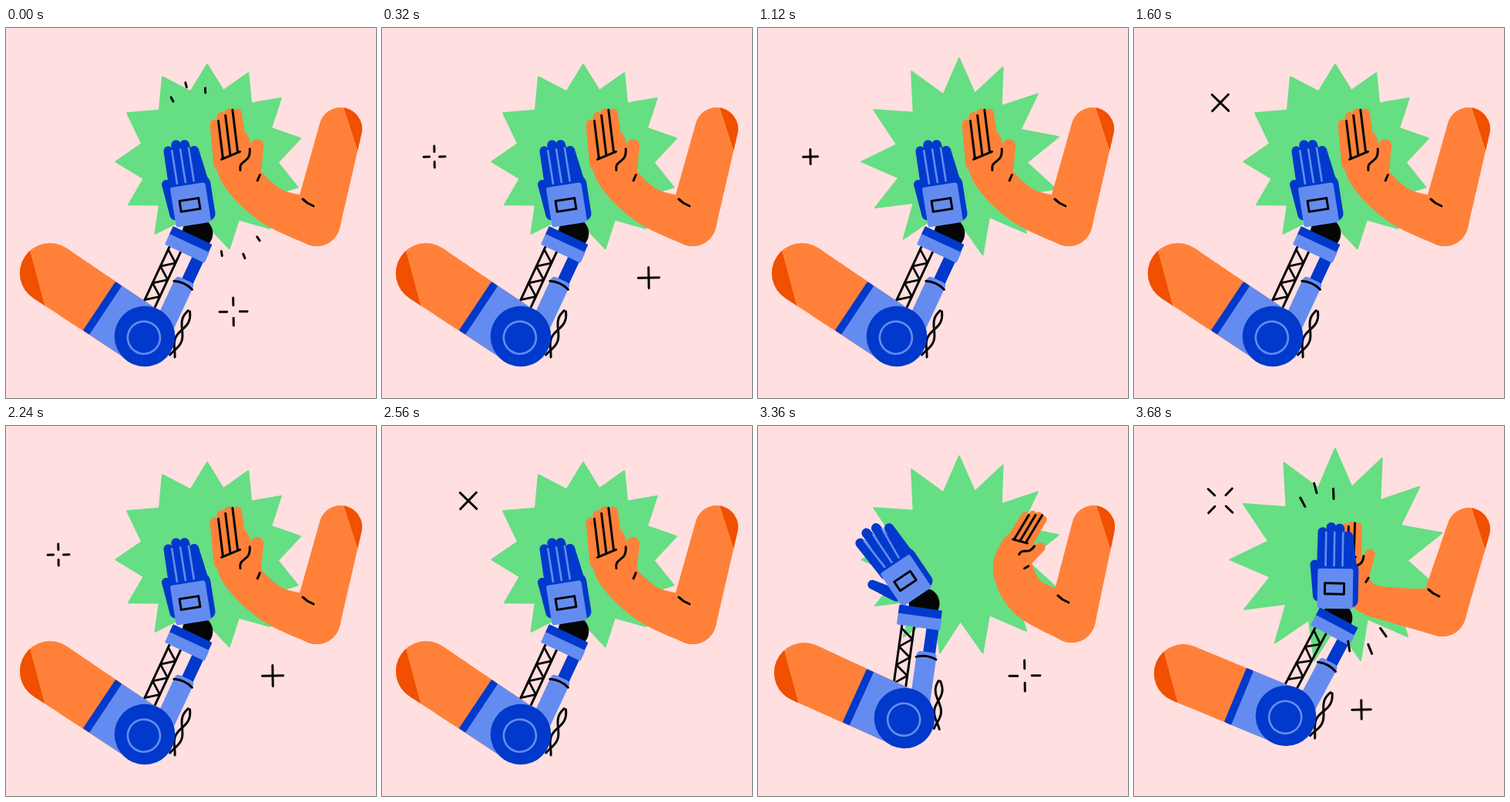
Recreate the animation shown at these times as an HTML page with a canvas. Size 480 by 480 pixels, loop 3.84 s.

```html
<!DOCTYPE html>
<html lang="en">
<head>
<meta charset="utf-8">
<title>High five</title>
<style>
  html, body { margin: 0; width: 100%; height: 100%; overflow: hidden; background: #ffdfe0; }
  canvas { display: block; width: 480px; height: 480px; }
</style>
</head>
<body>
<canvas id="stage" width="480" height="480"></canvas>
<script>
const ctx = document.getElementById('stage').getContext('2d');
const STEP = 160, STEPS = 24, RAD = Math.PI / 180;
const PINK = '#ffdfe0', GREEN = '#66de83', ORANGE = '#ff8139', RUST = '#f05000',
      BLUE = '#0039cb', SKY = '#648cf0', BLACK = '#050505';

// Limb keys are [x, y, radius]; angles are in degrees; open spreads the robot's fingers.
const rest = {
  shoulder: [434, 131, 28],
  forearm: [[403, 252, 31], [345, 231, 25], [303, 190, 25], [293, 152, 24]],
  hand: { at: [291, 165], angle: -7, scale: 1 },
  robot: { shoulder: [57, 318, 39], elbow: [180, 400, 38], fore: 25, palm: [238.5, 229.5], angle: -9, open: 0 }
};
const back = {
  shoulder: [435, 131, 28],
  forearm: [[407, 250, 31], [352, 224, 27], [331, 187, 26], [336, 160, 22]],
  hand: { at: [340, 149], angle: 31, scale: 0.75 },
  robot: { shoulder: [60, 320, 39], elbow: [190, 379, 38], fore: 8, palm: [191, 201], angle: -34, open: 1 }
};
const clap = {
  shoulder: [434, 134, 28],
  forearm: [[400, 242, 31], [340, 233, 23], [300, 222, 20], [283, 195, 19]],
  hand: { at: [277, 172], angle: 2, scale: 0.8 },
  robot: { shoulder: [64, 321, 38], elbow: [197, 376, 38], fore: 28, palm: [260, 211], angle: 1, open: 0 }
};

function mix(a, b, t) {
  if (typeof a === 'number') return a + (b - a) * t;
  if (Array.isArray(a)) return a.map((v, i) => mix(v, b[i], t));
  return Object.fromEntries(Object.keys(a).map(k => [k, mix(a[k], b[k], t)]));
}
const windUp = mix(rest, back, 0.55);

function fill(color) {
  ctx.fillStyle = color;
  ctx.fill();
}
function stroke(color, width) {
  ctx.strokeStyle = color;
  ctx.lineWidth = width;
  ctx.stroke();
}
function line(points, color = BLACK, width = 3) {
  ctx.beginPath();
  points.forEach(p => ctx.lineTo(...p));
  stroke(color, width);
}
function disc(x, y, r, color) {
  ctx.beginPath();
  ctx.arc(x, y, r, 0, 7);
  fill(color);
}
function box(x0, y0, x1, y1, color, corner = 1.5) {
  ctx.beginPath();
  ctx.roundRect(x0, y0, x1 - x0, y1 - y0, corner);
  fill(color);
}
function within([x, y], degrees, scale, draw) {
  ctx.save();
  ctx.translate(x, y);
  ctx.rotate(degrees * RAD);
  ctx.scale(scale, scale);
  draw();
  ctx.restore();
}

const catmull = (a, b, c, d, t) =>
  b + t / 2 * (c - a + t * (2 * a - 5 * b + 4 * c - d + t * (3 * (b - c) + d - a)));

// Rounded tube swept along a smooth curve through the keys.
function tube(keys, color) {
  const key = i => keys[Math.max(0, Math.min(keys.length - 1, i))];
  ctx.beginPath();
  for (let i = 0; i < keys.length - 1; i++) {
    for (let s = 0; s <= 40; s++) {
      const [x, y, r] = [0, 1, 2].map(n =>
        catmull(key(i - 1)[n], key(i)[n], key(i + 1)[n], key(i + 2)[n], s / 40));
      ctx.moveTo(x + r, y);
      ctx.arc(x, y, r, 0, 2 * Math.PI);
    }
  }
  fill(color);
}

function upperArm(shoulder, elbow, shadeAngle) {
  tube([shoulder, elbow], ORANGE);
  const r = shoulder[2];
  ctx.save();
  ctx.clip();
  within(shoulder, shadeAngle, 1, () => box(r * 0.45, -2 * r, 2 * r, 2 * r, RUST));
  ctx.restore();
}

function burst(tip, notch) {
  ctx.beginPath();
  for (let k = 0; k < 13; k += 0.5) {
    const wobble = 3.8 * Math.cos(4 * Math.PI * (k + 0.5) / 13) - 3.8;
    const a = (k * 360 / 13 - 90 + wobble) * RAD;
    const r = (k % 1 ? notch : tip) + 6 * Math.cos(a + 75 * RAD);
    ctx.lineTo(262 + r * Math.cos(a), 174 + r * Math.sin(a));
  }
  ctx.closePath();
  fill(GREEN);
  stroke(GREEN, 2);
}

function humanHand({ at, angle, scale }) {
  within(at, angle, scale, () => {
    const width = 3 / scale;
    for (let k = 0; k < 4; k++) {
      const x = (k - 1.5) * 10;
      tube([[x, 10, 8], [x, 2.5 * (k - 2.2) ** 2 - 54, 6.5]], ORANGE);
    }
    tube([[22, 28, 14], [36, -8, 8.5]], ORANGE);
    for (let k = -1; k < 2; k++) line([[k * 10, -k * 3], [k * 10, -52 - k * 6]], BLACK, width);
    line([[-12, 4], [13, -3]], BLACK, width);
    ctx.beginPath();
    ctx.moveTo(26, -5);
    ctx.bezierCurveTo(25, 15, 10, 6, 10.5, 21);
    stroke(BLACK, width);
    line([[35, 30], [31, 37]], BLACK, width);
  });
}

function humanArm({ shoulder, forearm, hand }) {
  const [x, y] = forearm[0];
  upperArm(shoulder, forearm[0], -18);
  tube(forearm, ORANGE);
  humanHand(hand);
  line([[x - 18, y - 30], [x - 12, y - 25], [x - 4, y - 21]]);
}

// Forearm frame: elbow at the origin, wrist straight up.
function robotForearm() {
  for (const side of [-1, 1]) {
    const wire = [];
    for (let y = -54; y <= 8; y += 2) wire.push([41 + (y + 20) / 12 + side * 4.5 * Math.sin(y / 9), y]);
    line(wire);
  }
  const truss = [];
  for (let k = 0; k < 7; k++) truss.push([k % 2 ? -4 : -20, 12 * k - 115]);
  line(truss, BLACK, 2.8);
  for (const x of [-20, -4]) line([[x, -30], [x, -122]]);
  box(12, -128, 28, -80, BLUE);
  box(4, -89, 30, -8, SKY, 5);
  ctx.beginPath();
  ctx.moveTo(4, -81);
  ctx.quadraticCurveTo(17, -86, 30, -81);
  stroke(BLACK, 3);
}

function robotCuff() {
  box(-27, -145, 29, -132, BLUE);
  box(-27, -134, 30, -119, SKY);
}

// Hand frame: centre of the palm plate at the origin, fingers up.
function robotHand(open) {
  disc(4, 38, 20, BLACK);
  tube([[-20, 9, 8], [-26 - 12 * open, -31 + 11 * open, 6]], BLUE);
  const spread = 11 + 3 * open;
  for (let k = 0; k < 4; k++) {
    tube([[(k - 1.5) * 12 + 3, -22, 8.5],
      [(k - 1.5) * spread, 4 * (k - 1.3) ** 2 - 80, 6.3]], BLUE);
  }
  tube([[21, -25, 10], [22, 15, 9]], BLUE);
  for (let k = -1; k < 2; k++) line([[k * spread - 1, -73], [k * 11 - 1, -30]], SKY, 2.6);
  box(-22, -26, 24, 26, SKY, 3);
  ctx.beginPath();
  ctx.rect(-12.5, -7, 25, 14);
  stroke(BLACK, 3);
}

// Joint frame: elbow at the origin, upper arm pointing left.
function robotJoint() {
  box(-62, -38, 0, 38, SKY);
  box(-71, -38, -61, 38, BLUE);
  disc(0, 0, 39.3, BLUE);
  ctx.beginPath();
  ctx.arc(0, 2, 21, 0, 7);
  stroke(SKY, 2.6);
}

function robotArm({ shoulder, elbow, fore, palm, angle, open }) {
  const tilt = Math.atan2(elbow[1] - shoulder[1], elbow[0] - shoulder[0]) / RAD;
  within(elbow, fore, 1, robotForearm);
  within(palm, angle, 1, () => robotHand(open));
  within(elbow, fore, 1, robotCuff);
  upperArm(shoulder, elbow, 165);
  within(elbow, tilt, 1, robotJoint);
}

// Each sparkle is a cross for one step, then flies apart for one step.
const sparkles = [
  { at: [68, 167], born: 1, size: 14, tilt: 0 },
  { at: [346, 324], born: 2, size: 20, tilt: 0 },
  { at: [112, 97], born: 4, size: 22, tilt: 45 },
  { at: [295, 368], born: 5, size: 18, tilt: 0 }
];
function sparkle({ at, born, size, tilt }, step) {
  const age = (step - born + 6) % 6;
  if (age > 1) return;
  const [inner, outer] = age ? [size * 0.46, size] : [0, size * 0.68];
  for (let k = 0; k < 4; k++) {
    within(at, tilt + k * 90 - 1, 1, () => line([[inner, 0], [outer, 0]]));
  }
}

function impact(shift, half) {
  for (const [first, radius] of [[-92, 92], [81, 107]]) {
    for (let k = 0; k < 3; k++) {
      const r = radius + shift + (k === 1 ? 11 : 0);
      within([262, 180], first - 13 * k, 1, () => line([[r - half, 0], [r + half, 0]]));
    }
  }
}

function draw(step) {
  const pose = step < 20 ? rest : [windUp, back, clap, clap][step - 20];
  ctx.lineCap = ctx.lineJoin = 'round';
  ctx.fillStyle = PINK;
  ctx.fillRect(0, 0, 480, 480);
  if (step < 22) burst(...(step % 2 ? [129, 85] : [121, 89]));
  else burst(step === 22 ? 146 : 139, 91);
  humanArm(pose);
  robotArm(pose.robot);
  sparkles.forEach(s => sparkle(s, step));
  if (step === 23) impact(0, 6.5);
  if (step === 0) impact(7, 3);
}

const start = performance.now();
function tick() {
  draw(Math.floor((performance.now() - start) / STEP) % STEPS);
  requestAnimationFrame(tick);
}
tick();
</script>
</body>
</html>
```
